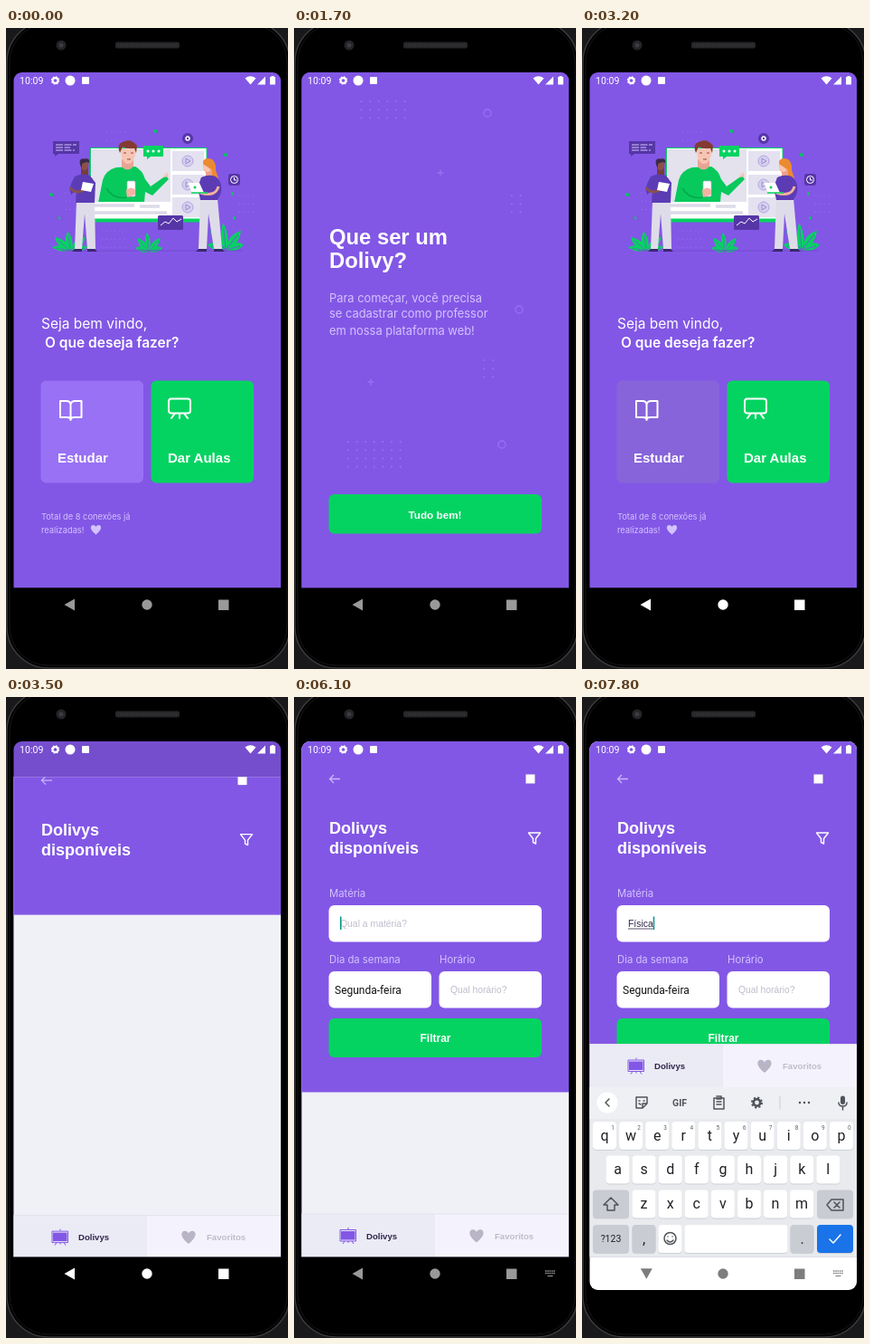
Animation of 312x708 px, one loop 8 s. Source, as an HTML page:

```html
<!DOCTYPE html>
<html lang="pt-BR">
<head>
<meta charset="utf-8">
<title>Dolivy</title>
<style>
  html, body { margin: 0; width: 100%; height: 100%; overflow: hidden; background: #151517; }
  svg { display: block; }
  text { font-family: Inter, "Open Sans", sans-serif; fill: #fff; white-space: pre; }
  .arial { font-family: "Liberation Sans", Arial, sans-serif; }
  .bold { font-family: "Liberation Sans", Arial, sans-serif; font-weight: 700; }
  .robo { font-family: Roboto, sans-serif; }
  .mid { text-anchor: middle; }
  .soft { fill: #d4c2ff; }
  .hint { fill: #c1bccc; }
  .line { fill: none; stroke: #fff; stroke-width: 2; stroke-linecap: round; stroke-linejoin: round; }
  .deco { fill: none; stroke: #9871f5; stroke-width: 1.3; }
  .tool { fill: none; stroke: #50545a; stroke-width: 1.5; stroke-linejoin: round; stroke-linecap: round; }
</style>
</head>
<body>
<svg id="stage" width="312" height="708" viewBox="0 0 312 708">
  <defs>
    <clipPath id="screen"><rect x="8.500" y="49" width="295.500" height="606" rx="9"/></clipPath>
    <clipPath id="app"><rect x="8" y="49" width="296" height="569.500"/></clipPath>
    <clipPath id="reveal"><rect id="revealRect" x="8" width="296" height="570"/></clipPath>
    <clipPath id="teachClip"><rect x="160.500" y="389.500" width="113.500" height="113" rx="6"/></clipPath>
    <clipPath id="studyClip"><rect x="38.500" y="389.500" width="113.500" height="113" rx="6"/></clipPath>
    <clipPath id="callClip"><rect x="95" y="120" width="87" height="72"/></clipPath>
    <path id="heart" d="M0 5.500C-8-.5-6-5-3-5-1.500-5-.5-4 0-3 .5-4 1.500-5 3-5 6-5 8-.5 0 5.500Z"/>
    <g id="plant" fill="#04d361">
      <path d="M0 0C-7-7-6-14-3-21 3-15 4-7 0 0Z"/>
      <path d="M0 0C-10-2-15-7-17-15-8-13-1-9 0 0Z"/>
      <path d="M0 0C2-9 8-13 17-15 15-7 10-2 0 0Z"/>
      <path d="M0 0C-8 2-15 0-20-4-12-7-4-6 0 0ZM0 0C8 2 15 0 20-4 12-7 4-6 0 0Z"/>
      <path d="M0 0-2-17M0 0-14-12M0 0 14-12M0 0-16-3M0 0 16-3" stroke="#5f6fc0" stroke-width=".9"/>
    </g>
    <g id="play">
      <rect x="-17" y="-11" width="35" height="22" fill="#e4e2f0"/>
      <circle r="6" fill="#d6d0ee" stroke="#b3a6dd"/>
      <path d="M-2-3 3 0-2 3Z" fill="none" stroke="#9c8bd0"/>
    </g>
    <g id="gear">
      <circle r="3.400" fill="none" stroke="#fff" stroke-width="2.400"/>
      <circle r="4.700" fill="none" stroke="#fff" stroke-width="1.600" stroke-dasharray="1.850 1.850"/>
    </g>
  </defs>

  <rect width="312" height="708" fill="#19191b"/>
  <rect x="1" y="-8" width="313" height="715" rx="46" stroke="#3b3b3e" stroke-width="1.500"/>
  <rect x="4" y="-5" width="307" height="709" rx="43" stroke="#161618"/>
  <circle cx="61" cy="19" r="5.500" fill="#242428"/><circle cx="61" cy="19" r="2.500" fill="#3b3b44"/>
  <rect x="121" y="15.500" width="71" height="7" rx="2" fill="#272729"/>
  <path d="M124 19H189" stroke="#343437" stroke-width="3" stroke-dasharray="1 1"/>

  <g clip-path="url(#screen)">
    <g clip-path="url(#app)">
      <rect x="8" y="49" width="296" height="570" fill="#8257e5"/>
      <g id="home">
        <g id="homeDots" fill="#9871f5"></g>
        <use href="#plant" x="71" y="246"/>
        <use href="#plant" transform="translate(158 247) scale(.75 1)"/>
        <use href="#plant" transform="translate(243 245) scale(1 1.400)"/>
        <path d="M62 246H262" stroke="#6f48cb" stroke-width=".8"/>
        <rect x="93" y="132" width="129.500" height="82.500" rx="2" fill="#04d361"/>
        <rect x="94" y="133" width="127.500" height="77.500" fill="#fff"/>
        <rect x="95" y="134" width="87" height="58" fill="#e3e2ed"/>
        <path d="M97 196H142M97 204H178M148 197H170" stroke="#dddae8" stroke-width="3.500"/>
        <use href="#play" x="201" y="147"/><use href="#play" x="201" y="173"/><use href="#play" x="201" y="198"/>
        <g clip-path="url(#callClip)">
          <path d="M102 193 107 168Q110 157 122 154L143 153Q151 157 154 167L160 175 177 163 180 167 162 185 154 181 153 193Z" fill="#08c95c"/>
          <path d="M111 177Q119 190 134 187" fill="none" stroke="#04a94c" stroke-width="1.500"/>
          <path d="M128 145H141V153Q134 160 128 153Z" fill="#e8a594"/>
        </g>
        <path d="M127 133Q127 148 134 150 142 151 144 134Z" fill="#f8c4b4"/>
        <path d="M126 138Q122 128 129 126 138 121 145 130L144 138 142 133Q134 134 129 131Z" fill="#843a32"/>
        <path d="M130 138H133M138 138H141M134 145H138" stroke="#8b4a48"/>
        <rect x="134" y="169" width="9" height="17" rx="1.500" fill="#fff" stroke="#b8b3ca" stroke-width=".7"/>
        <path d="M133 179Q139 174 143 179V184L134 187Z" fill="#f4b3a2"/>
        <path d="M174 165 178 159 180 164Z" fill="#f8c4b4"/>
        <path d="M152 130H174V142H160L156 145V142H152Z" fill="#04d361"/>
        <path d="M157 136H171" stroke="#fff" stroke-width="3" stroke-linecap="round" stroke-dasharray=".01 6"/>
        <g fill="#5636a7">
          <path d="M52 125H81V139H58L54 142V139H52Z"/>
          <circle cx="201" cy="122" r="6"/><rect x="246" y="161" width="13" height="13" rx="3"/>
          <rect x="168" y="207" width="28" height="16" rx="1.500"/>
        </g>
        <path d="M55 129H78M55 132H71M55 135H76" stroke="#d4c2ff" stroke-dasharray="8 1.500"/>
        <use href="#gear" transform="translate(201 122) scale(.55)"/>
        <circle cx="252.500" cy="167.500" r="4" fill="none" stroke="#fff"/><path d="M252.500 165V168H255" fill="none" stroke="#fff"/>
        <path d="M171 218 176 214 180 216 185 210 189 214 194 211" fill="none" stroke="#fff"/>
        <g>
          <path d="M78 191H98L99 244H90L87 205 84 244H76Z" fill="#dfdce9"/>
          <path d="M83 152H91V164H83Z" fill="#743e3a"/>
          <path d="M76 164Q84 160 93 163L99 171 98 193H77L78 179 72 184Q68 177 76 164Z" fill="#5b3cb5"/>
          <ellipse cx="87" cy="151" rx="4.500" ry="6" fill="#8a5149"/>
          <path d="M82 151Q80 143 87 144.500 93 143 92 149L89 148 84 150V155Z" fill="#3b2a4a"/>
          <path d="M71 176Q77 185 87 178" fill="none" stroke="#8a5149" stroke-width="3"/>
          <path d="M85 170 97 172 94 181 83 179Z" fill="#fff"/>
          <path d="M76 244H84V247H73M90 244H98L101 247H90" fill="#3a276f"/>
        </g>
        <g>
          <path d="M215 188H234L239 244H230L224 205 222 244H213Z" fill="#dfdce9"/>
          <path d="M218 147Q221 142 228 145 233 149 232 157L235 166H227L219 157Z" fill="#ec8a32"/>
          <path d="M221 156H228V165H221Z" fill="#eba08b"/>
          <ellipse cx="223" cy="153" rx="4.500" ry="6" fill="#f8c4b4"/>
          <path d="M218 150Q221 144 228 148V157Z" fill="#ec8a32"/>
          <path d="M216 165Q224 161 232 164 240 170 238 182L234 190H215L212 176Z" fill="#5b3cb5"/>
          <path d="M235 175Q232 187 215 182" fill="none" stroke="#f4b29c" stroke-width="3"/>
          <path d="M201 171H214L219 182H206Z" fill="#fff"/><circle cx="209" cy="176" r="1.500" fill="#04d361"/>
          <path d="M205 182H223" stroke="#04d361" stroke-width="1.500"/>
          <path d="M213 244H222V247H210M230 244H239L242 247H230" fill="#3a276f"/>
        </g>
        <path d="M163 114H167M48 184H52M58 210H60M241 140H245M249 183H252M251 210H254" stroke="#04c560" stroke-width="3"/>

        <text x="39" y="332" font-size="15.500">Seja bem vindo,</text>
        <text x="43" y="353" font-size="15.500" font-weight="600">O que deseja fazer?</text>
        <rect x="38.500" y="389.500" width="113.500" height="113" rx="6" fill="#9871f5"/>
        <rect x="160.500" y="389.500" width="113.500" height="113" rx="6" fill="#04d361"/>
        <g clip-path="url(#studyClip)"><circle id="studyRipple" cx="96" cy="448"/></g>
        <g clip-path="url(#teachClip)"><circle id="teachRipple" cx="217" cy="448"/></g>
        <path class="line" d="M71.500 416Q71 412 67 412H60V430H67.500Q71.500 430 71.500 433 71.500 430 75.500 430H83.500V412H76.500Q72 412 71.500 416V433"/>
        <path class="line" d="M183 409.500H201Q204 409.500 204 412.500V422.500Q204 425.500 201 425.500H183Q180 425.500 180 422.500V412.500Q180 409.500 183 409.500ZM187 425.500 183 431M197 425.500 201 431M192 425.500V431"/>
        <text class="bold" x="57" y="480" font-size="15">Estudar</text>
        <text class="bold" x="179" y="480" font-size="15">Dar Aulas</text>
        <text class="soft" x="39" y="542.500" font-size="9.300">Total de 8 conexões já</text>
        <text class="soft" x="39" y="557.500" font-size="9.300">realizadas!</text>
        <use href="#heart" x="99.500" y="554" fill="#d4c2ff"/>
      </g>
      <rect id="shade" x="8" y="49" width="296" height="570"/>

      <g clip-path="url(#reveal)">
        <g id="give">
          <rect x="8" y="30" width="296" height="620" fill="#8257e5"/>
          <g id="giveDots" fill="#9871f5"></g>
          <g class="deco">
            <circle cx="214" cy="94" r="4"/><circle cx="249" cy="311" r="4"/><circle cx="230" cy="460" r="4"/>
            <path d="M158.500 160H165.500M162 156.500V163.500M81.500 391H88.500M85 387.500V394.500"/>
          </g>
          <text class="bold" x="39" y="239" font-size="23.800">Que ser um</text>
          <text class="bold" x="39" y="265" font-size="23.800">Dolivy?</text>
          <g font-size="12.900">
            <text class="soft" x="39" y="302.500">Para começar, você precisa</text>
            <text class="soft" x="39" y="319.500">se cadastrar como professor</text>
            <text class="soft" x="39" y="338.500">em nossa plataforma web!</text>
          </g>
          <rect x="38.500" y="515" width="235.500" height="43.500" rx="6" fill="#04d361"/>
          <text class="bold mid" x="156" y="542" font-size="11.700">Tudo bem!</text>
        </g>

        <g id="list">
          <rect x="8" y="49" width="296" height="600" fill="#f0f0f7"/>
          <rect id="header" x="8" y="49" width="296" fill="#8257e5"/>
          <path d="M51 90.500H39.500M44 86 39.500 90.500 44 95" fill="none" stroke="#c9b5f8" stroke-width="1.300"/>
          <rect x="256.500" y="85.500" width="10" height="10" fill="#fff"/>
          <text class="bold" x="39" y="151" font-size="18">Dolivys</text>
          <text class="bold" x="39" y="173" font-size="18">disponíveis</text>
          <circle id="filterRipple" cx="266" cy="156"/>
          <path d="M259.500 150H272.500L267.500 156.500V162L264.500 160.500V156.500Z" fill="none" stroke="#fff" stroke-width="1.400" stroke-linejoin="round"/>
          <g id="form">
            <g font-size="11.300">
              <text class="soft" x="39" y="220.500">Matéria</text>
              <text class="soft" x="39" y="294">Dia da semana</text>
              <text class="soft" x="161" y="294">Horário</text>
            </g>
            <g fill="#fff">
              <rect x="38.500" y="230" width="235.500" height="40.500" rx="6"/>
              <rect x="38.500" y="303" width="113.500" height="40.500" rx="6"/>
              <rect x="160.500" y="303" width="113.500" height="40.500" rx="6"/>
            </g>
            <text id="subject" class="arial" x="51" y="254" font-size="10.400"></text>
            <path id="underline" stroke="#32264d" stroke-width=".8"/>
            <rect id="caret" y="242.500" width="1.500" height="14.500" fill="#009688"/>
            <text class="robo" x="45" y="328" font-size="12" style="fill:#111">Segunda-feira</text>
            <text class="arial hint" x="173" y="327" font-size="10.300">Qual horário?</text>
            <rect x="38.500" y="355" width="235.500" height="43" rx="6" fill="#04d361"/>
            <text class="bold mid" x="156.500" y="381" font-size="12">Filtrar</text>
          </g>
          <g id="tabs">
            <rect x="8" y="571" width="148" height="48" fill="#ebebf5"/>
            <rect x="156" y="571" width="148" height="48" fill="#f4f3fd"/>
            <path d="M8 571H304" stroke="#e4e3ed"/>
            <rect x="52" y="590" width="15.500" height="9.500" fill="#8257e5"/>
            <path d="M51 588.500H68.500V601H51ZM60 586V588M56 601 54 604M64 601 66 604M60 601V603" fill="none" stroke="#8257e5"/>
            <text class="bold" x="80" y="598.500" font-size="9.600" style="fill:#32264d">Dolivys</text>
            <use href="#heart" transform="translate(202 595) scale(1.350 1.350)" fill="#b9b4c6"/>
            <text class="bold hint" x="222" y="598.500" font-size="9.600">Favoritos</text>
          </g>
        </g>
      </g>

      <g id="keyboard">
        <rect x="8" y="431" width="296" height="190" fill="#e8eaee"/>
        <rect x="8" y="431" width="296" height="35" fill="#eff0f4"/>
        <circle cx="28" cy="448" r="11.500" fill="#fff"/>
        <g class="tool">
          <path d="M30 444 26 448 30 452M72 449V442H60V454H67L72 449H67V454M63 446H64M68 446H69M63 449 65 450"/>
          <path d="M146 443H157V455H146ZM149 441H154V444H149M149 447H154M149 450H154"/>
          <path d="M219 441V455" stroke="#cbcdd2" stroke-width="1"/>
          <path d="M241 448H252" stroke-width="2.500" stroke-dasharray=".01 5"/>
          <path d="M284 448Q284 452 288.500 452 293 452 293 448M288.500 452V456"/>
          <circle cx="193.500" cy="448" r="3.700" style="stroke-width:2.600"/>
          <circle cx="193.500" cy="448" r="5.500" style="stroke-width:2;stroke-linecap:butt" stroke-dasharray="2.160 2.160"/>
        </g>
        <rect x="286" y="440.500" width="5" height="9.500" rx="2.500" fill="#50545a"/>
        <text class="robo mid" x="108" y="452" font-size="10.500" font-weight="700" style="fill:#50545a">GIF</text>
        <g id="keys"></g>
        <g class="tool">
          <path d="M32 553 40 561H36V567H28V561H24Z"/>
          <path d="M276 555H289V567H276L271 561ZM279 558 285 564M285 558 279 564"/>
          <circle cx="97.500" cy="598" r="6.500"/><path d="M95 596V596.100M100 596V596.100M94 600Q97.500 604 101 600"/>
          <path d="M274 599 278 603 286 594" style="stroke:#fff"/>
        </g>
      </g>
    </g>

    <g id="nav">
      <rect id="navBack" x="8" y="618.500" width="296" height="37"/>
      <rect id="navRipple" x="37" y="619" width="67" height="36" rx="18" fill="#fff"/>
      <path id="backIcon" d="M64.500 637 76 630.500V643.500Z"/>
      <circle cx="156" cy="637" r="5.700"/><rect x="235" y="631.500" width="11.500" height="11.500"/>
      <g id="imeIcon"><path d="M278 634H289M278 636.500H289" stroke-width="1.500" stroke-dasharray="1.500 .8"/><path d="M280.500 639.500H286.500"/></g>
    </g>

    <g fill="#fff">
      <text class="robo" x="15" y="62" font-size="10.600">10:09</text>
      <use href="#gear" transform="translate(54.500 58) scale(.85)"/>
      <circle cx="71" cy="58" r="5.500"/><rect x="84" y="54" width="8" height="8" rx="1"/>
      <path d="M264.500 55.500Q270.500 51 276.500 55.500L270.500 62.500ZM278 62.500 287 53.500V62.500ZM292 54H293.500V53H296.500V54H298V62.500H292Z"/>
    </g>
  </g>
</svg>
<script>
const $ = id => document.getElementById(id);
const set = (id, attrs) => { for (const k in attrs) $(id).setAttribute(k, attrs[k]); };
const show = (id, on) => set(id, { visibility: on ? 'inherit' : 'hidden' });
const clamp = v => Math.max(0, Math.min(1, v));
const LOOP = 8000, APP_TOP = 49, APP_H = 570, DURATION = 520;

function dots(id, x, y, cols, rows, gap = 9.6, r = 1) {
  for (let i = 0; i < cols * rows; i++)
    $(id).innerHTML += `<circle cx="${x + i % cols * gap}" cy="${y + Math.floor(i / cols) * 9.2}" r="${r}"/>`;
}
dots('giveDots', 74.500, 81, 6, 3);
dots('giveDots', 241, 185, 2, 3);
dots('giveDots', 210.500, 367, 2, 3);
dots('giveDots', 60, 457, 7, 4);
dots('homeDots', 258, 185, 4, 3, 5, .6);
dots('homeDots', 66, 182, 3, 3, 5, .6);
dots('homeDots', 112, 115, 5, 2, 5, .6);
dots('homeDots', 106, 224, 6, 3, 5, .6);

function key(x, y, w, fill, label = '', size = 16, letter = '') {
  $('keys').innerHTML += `<rect x="${x - w / 2}" y="${y - 14.5}" width="${w}" height="31" rx="4" fill="#cdd0d5"/>
    <rect x="${x - w / 2}" y="${y - 15.5}" width="${w}" height="31" rx="4" fill="${fill}"/>
    <text class="robo mid ${letter}" x="${x}" y="${y + size * .34}" font-size="${size}" style="fill:#202124">${label}</text>`;
}
[['qwertyuiop', 25, 484.5], ['asdfghjkl', 39.5, 522], ['zxcvbnm', 68.5, 560]].forEach(([row, x0, y], r) => {
  [...row].forEach((ch, i) => {
    const x = x0 + i * 29.1;
    key(x, y, 26, '#fff', ch, 16, 'letter');
    if (!r) $('keys').innerHTML += `<text class="robo mid" x="${x + 9}" y="${y - 7}" font-size="6.5" style="fill:#5f6368">${(i + 1) % 10}</text>`;
  });
});
const GREY = '#c9ccd3';
key(32, 560, 40, GREY);
key(280, 560, 40, GREY);
key(32, 598.5, 40, GREY, '?123', 10.5);
key(68.5, 598.5, 26, GREY, ',');
key(97.5, 598.5, 26, '#fff');
key(170.5, 598.5, 114, '#fff');
key(243.5, 598.5, 26, GREY, '.');
key(280, 598.5, 40, '#1a73e8');
const letters = [...document.querySelectorAll('.letter')];

// y of a cubic bezier (.20833,.82,.25,1) at a given x
function ease(x) {
  if (x <= 0 || x >= 1) return clamp(x);
  const at = (s, a, b) => 3 * s * (1 - s) ** 2 * a + 3 * s * s * (1 - s) * b + s ** 3;
  let lo = 0, hi = 1;
  for (let i = 0; i < 24; i++) {
    const mid = (lo + hi) / 2;
    if (at(mid, .20833, .25) < x) lo = mid; else hi = mid;
  }
  return at(lo, .82, 1);
}
const progress = (t, start) => ease((t - start) / DURATION);

function ripple(id, t, start, radius) {
  const dt = t - start;
  set(id, { r: dt < 0 ? 0 : radius * Math.sqrt(clamp(dt / 250)), opacity: .12 * clamp((650 - dt) / 350) });
}

const TYPED = 'Física', KEY_TIMES = [7000, 7200, 7300, 7500, 7600, 7800], FOCUS = 5950, EXPAND = 5500;

function drawField(t) {
  const count = KEY_TIMES.filter(k => t >= k).length;
  const subject = $('subject');
  const text = count ? TYPED.slice(0, count) : 'Qual a matéria?';
  if (subject.textContent !== text) subject.textContent = text;
  subject.style.fill = count ? '#32264d' : '#c1bccc';
  const width = count ? subject.getComputedTextLength() : 0;
  set('underline', { d: count ? `M51 256H${51 + width}` : 'M0 0' });
  const last = count ? KEY_TIMES[count - 1] : FOCUS;
  set('caret', { x: 51 + width, opacity: t >= FOCUS && (t - last) % 1000 < 500 ? 1 : 0 });
  letters.forEach(l => {
    const ch = count ? l.textContent.toLowerCase() : l.textContent.toUpperCase();
    if (l.textContent !== ch) l.textContent = ch;
  });
}

function draw(t) {
  const onList = t >= 2900;
  const p = onList ? progress(t, 3255) : progress(t, 780) - progress(t, 2220);
  set('home', { transform: `translate(0 ${-.02 * APP_H * p})` });
  set('shade', { opacity: .1 * clamp(p / .36) });
  set('revealRect', { y: APP_TOP + (1 - p) * APP_H });
  show('give', !onList);
  show('list', onList);
  set(onList ? 'list' : 'give', { transform: `translate(0 ${.041 * APP_H * (1 - p)})` });

  ripple('teachRipple', t, 100, 82);
  ripple('studyRipple', t, 2880, 82);
  ripple('filterRipple', t, 5300, 18);

  const expanded = t >= EXPAND;
  set('header', { height: expanded ? 387.5 : 190 });
  show('form', expanded);
  drawField(t);

  const rise = 1 - (1 - clamp((t - 6200) / 260)) ** 3;
  const keyboardUp = t >= 6200;
  show('keyboard', keyboardUp);
  set('keyboard', { transform: `translate(0 ${(1 - rise) * 188})` });
  set('tabs', { transform: `translate(0 ${t >= 6300 ? -187.5 : 0})` });

  const level = t < 2000 ? 153 : Math.round(255 - 102 * clamp((t - 4800) / 800));
  const icon = keyboardUp ? '#7d7d7d' : `rgb(${level},${level},${level})`;
  set('nav', { fill: icon });
  set('navBack', { fill: keyboardUp ? '#fff' : '#000' });
  set('navRipple', { opacity: t < 2000 ? 0 : .2 * clamp((2500 - t) / 350) });
  set('backIcon', { transform: keyboardUp ? 'rotate(-90 70.8 636.5)' : '' });
  set('imeIcon', { stroke: icon });
  show('imeIcon', t >= FOCUS);
}

function tick() {
  draw(performance.now() % LOOP);
  requestAnimationFrame(tick);
}
tick();
</script>
</body>
</html>
```
